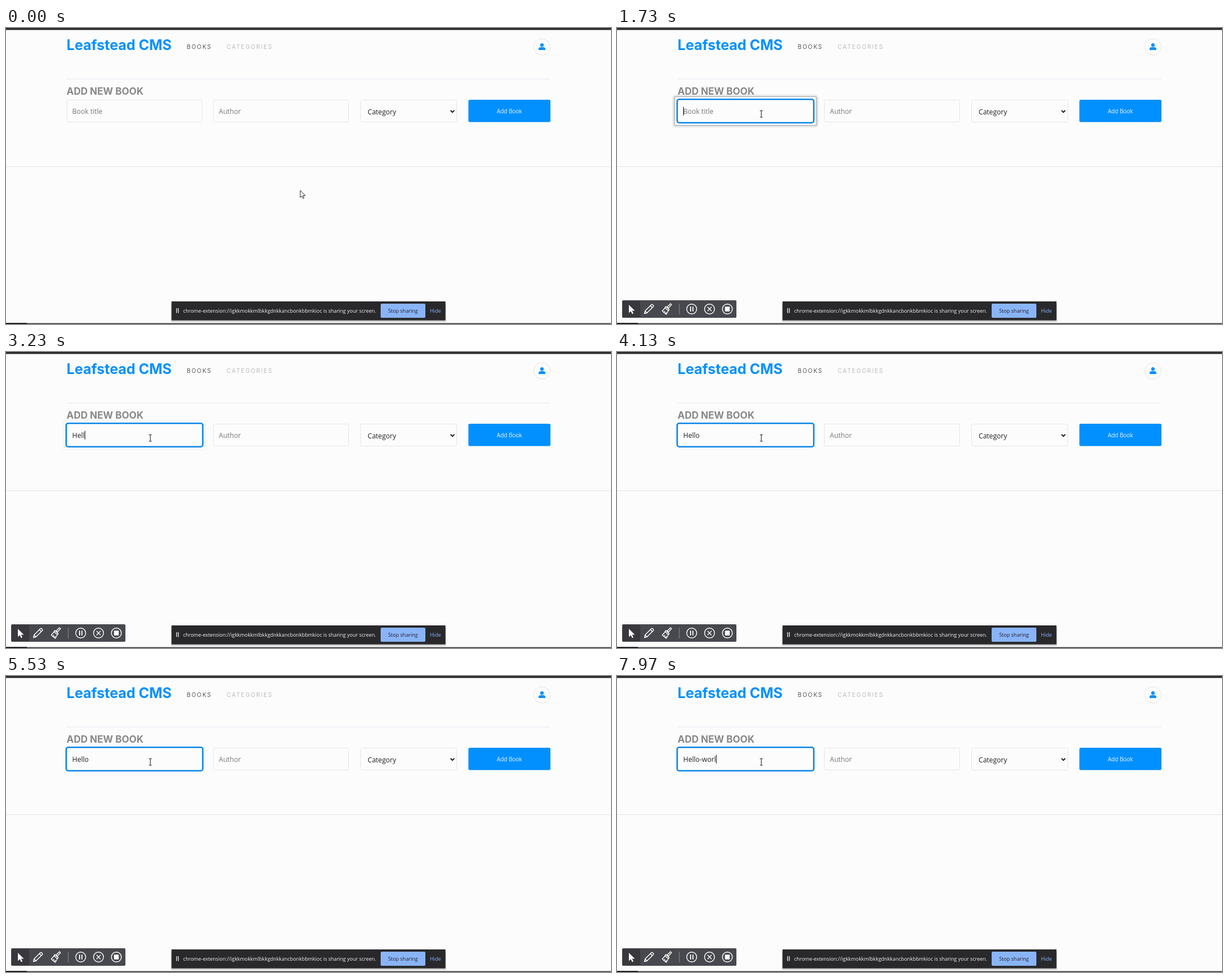
An HTML page that plays this animation: 1069 px wide and 524 px high, repeating every 8000 ms.

```html
<!DOCTYPE html>
<html lang="en">
<head>
<meta charset="utf-8">
<title>Add new book</title>
<style>
  html, body { margin: 0; width: 100%; height: 100%; overflow: hidden; background: #fcfcfc; }
  svg { display: block; }
  text { font: 12.1px "Open Sans", "Noto Sans", sans-serif; white-space: pre; }
  .head { font-family: Inter, sans-serif; font-weight: 700; }
  .nav { font: 300 10px Inter, sans-serif; letter-spacing: 2px; }
  .small { font-size: 9px; }
  .field { fill: #fcfcfc; stroke: #e6e6e6; }
  .icon { fill: none; stroke: #fff; stroke-width: 1.4; stroke-linejoin: round; stroke-linecap: round; }
</style>
</head>
<body>
<svg width="1069" height="524" viewBox="0 0 1069 524">
  <rect width="1069" height="524" fill="#fcfcfc"/>
  <rect width="1069" height="3.5" fill="#2c2b2e"/>
  <rect y="522.5" width="1069" height="1.5" fill="#38383a"/>
  <rect y="522" width="37" height="2" fill="#1b1b1d"/>

  <!-- header -->
  <text class="head" x="107" y="38.5" style="font-size:25px" fill="#0290ff">Leafstead CMS</text>
  <text class="nav" x="319.5" y="37" fill="#222">BOOKS</text>
  <text class="nav" x="390" y="37" fill="#a4a4a4">CATEGORIES</text>
  <circle cx="947" cy="33.5" r="14.5" fill="#fcfcfc" stroke="#e4e4e4"/>
  <g fill="#0290ff">
    <circle cx="947" cy="30.2" r="3.1"/>
    <path d="M941 39v-1.500q0-3.500 3.500-3.500h5q3.500 0 3.500 3.500v1.500z"/>
  </g>
  <path d="M107 90.500h855" stroke="#e8e8f4"/>
  <path d="M0 245.500h1069" stroke="#e4e4e0"/>

  <!-- form -->
  <text class="head" x="107" y="117.700" style="font-size:17px" fill="#888">ADD NEW BOOK</text>
  <rect class="field" x="107.500" y="127.500" width="239" height="39" rx="3"/>
  <rect class="field" x="366.500" y="127.500" width="239" height="39" rx="3"/>
  <rect class="field" x="626.500" y="127.500" width="170" height="39" rx="3"/>
  <g id="glow" fill="none">
    <rect x="100" y="120" width="254" height="54" rx="4" stroke="#999" stroke-opacity=".3" stroke-width="5"/>
    <rect x="103" y="123" width="248" height="48" rx="3" stroke="#fff" stroke-width="3"/>
    <rect x="101.300" y="121.300" width="251.400" height="51.400" rx="3" stroke="#666" stroke-width="1.300"/>
  </g>
  <rect id="ring" x="106.300" y="126.300" width="241.400" height="41.400" rx="3.500" fill="#fcfcfc" stroke="#0a86e8" stroke-width="2.600"/>
  <text id="title" x="117" y="151.500"></text>
  <rect id="caret" y="139.500" width="1" height="15.500" fill="#111"/>
  <text x="376" y="151.500" fill="#777">Author</text>
  <text x="639" y="152.500" fill="#222">Category</text>
  <path d="M785.500 145.800l3.300 3.300 3.300-3.300" fill="none" stroke="#111" stroke-width="1.900"/>
  <rect x="817" y="127" width="145" height="39.500" rx="2.500" fill="#0290ff"/>
  <text x="889.500" y="151" text-anchor="middle" style="font-size:9.900px" fill="#eaf5ff">Add Book</text>

  <!-- sharing notice -->
  <rect x="291" y="487" width="487" height="34" rx="3" fill="#000" opacity=".1"/>
  <rect x="292" y="486" width="485" height="33" rx="2" fill="#000" opacity=".16"/>
  <rect x="292.500" y="484" width="484" height="33.500" fill="#29292c"/>
  <path d="M301.500 496v8.500M304.500 496v8.500" stroke="#eee" stroke-width="1.300"/>
  <text x="313" y="503.500" style="font-size:8.920px" fill="#f2f2f2">chrome-extension://igkkmokkmlbkkgdnkkancbonkbbmkioc is sharing your screen.</text>
  <rect x="662" y="488" width="79" height="25" rx="2" fill="#8ab4f8"/>
  <text class="small" x="701.500" y="503.500" text-anchor="middle" fill="#202328">Stop sharing</text>
  <text class="small" x="749" y="503.500" fill="#8ab4f8">Hide</text>

  <!-- recorder tools -->
  <g id="tools">
    <rect x="9" y="482" width="202" height="31" rx="2" fill="#48494e"/>
    <rect x="10" y="483" width="31" height="29" rx="1" fill="#39393d"/>
    <path d="M21 490v14.500l3.500-3.200 2.300 5 2.200-1-2.300-4.800h4.800z" fill="#fff"/>
    <g class="icon">
      <path d="M48.500 505.500l1.200-4.700 11-11q1.200-1 2.400.2l1 1q1.100 1.200 0 2.300l-11 11zM59 491.500l3.500 3.500M49.800 501l3.200 3.200"/>
      <path d="M94.500 488l1.800 1.800-5.500 6.200-2.200-2.200zM86.500 493l5.800 5.800-1.800 1.800-5.800-5.800zM85 495.500l-5 5.500 7 6 3.500-6M82.500 503.500l2-2M85 505.500l2-2"/>
      <circle cx="132" cy="497.500" r="8.800"/>
      <path d="M130 494v7M134.200 494v7" stroke-width="1.800"/>
      <circle cx="163.500" cy="497.500" r="8.800"/>
      <path d="M160.300 494.300l6.400 6.400M166.700 494.300l-6.400 6.400"/>
      <circle cx="195" cy="497.500" r="8.800"/>
    </g>
    <rect x="190.800" y="493.300" width="8.400" height="8.400" rx="1" fill="#fff"/>
    <path d="M110 488v19" stroke="#8b8c90"/>
  </g>

  <path id="arrow" d="M0 0v12.500l2.800-2.600 1.900 4.300 2-.9-1.900-4.100h4z" fill="#fff" stroke="#222" stroke-linejoin="round"/>
  <path id="beam" d="M-2.500-5.500h2l.5.500.5-.5h2M0-5v10.500M-2.500 6h2l.5-.5.500.5h2" fill="none" stroke="#222" stroke-width="1.100"/>
</svg>
<script>
  const LOOP = 8000, FOCUS = 1650, BLINK = 530;
  const PHRASE = "Hello-worl";
  const KEYS = [2430, 2800, 3000, 3200, 3430, 6800, 7150, 7400, 7620, 7850];
  const [glow, ring, title, caret, tools, arrow, beam] =
    ["glow", "ring", "title", "caret", "tools", "arrow", "beam"].map(id => document.getElementById(id));

  const clamp = v => Math.max(0, Math.min(1, v));
  const ramp = (t, from, to) => clamp((t - from) / (to - from));
  const ease = p => p * p * (3 - 2 * p);
  const show = (el, on) => el.setAttribute("visibility", on ? "visible" : "hidden");

  function movePointer(t) {
    const p = ease(ramp(t, 80, 800));
    const x = 520 - 265 * p, y = 287.500 - 135.500 * p;
    const overField = x > 107 && x < 347 && y > 127 && y < 167;
    for (const el of [arrow, beam]) el.setAttribute("transform", `translate(${x} ${y})`);
    show(arrow, !overField);
    show(beam, overField);
  }

  function fillTitle(t) {
    const focused = t >= FOCUS;
    const typed = KEYS.filter(k => k <= t);
    title.textContent = PHRASE.slice(0, typed.length) || "Book title";
    title.setAttribute("fill", typed.length ? "#222" : "#777");
    const width = typed.length ? title.getComputedTextLength() : 0;
    const lastInput = typed.length ? typed[typed.length - 1] : FOCUS;
    caret.setAttribute("x", 117 + Math.round(width));
    show(caret, focused && (t - lastInput) % (2 * BLINK) < BLINK);
    show(ring, focused);
    glow.setAttribute("opacity", ramp(t, FOCUS, FOCUS + 150) * (1 - ramp(t, 2850, 3250)));
  }

  function draw(now) {
    const t = now % LOOP;
    movePointer(t);
    fillTitle(t);
    show(tools, t >= 300);
    requestAnimationFrame(draw);
  }
  draw(0);
</script>
</body>
</html>
```
